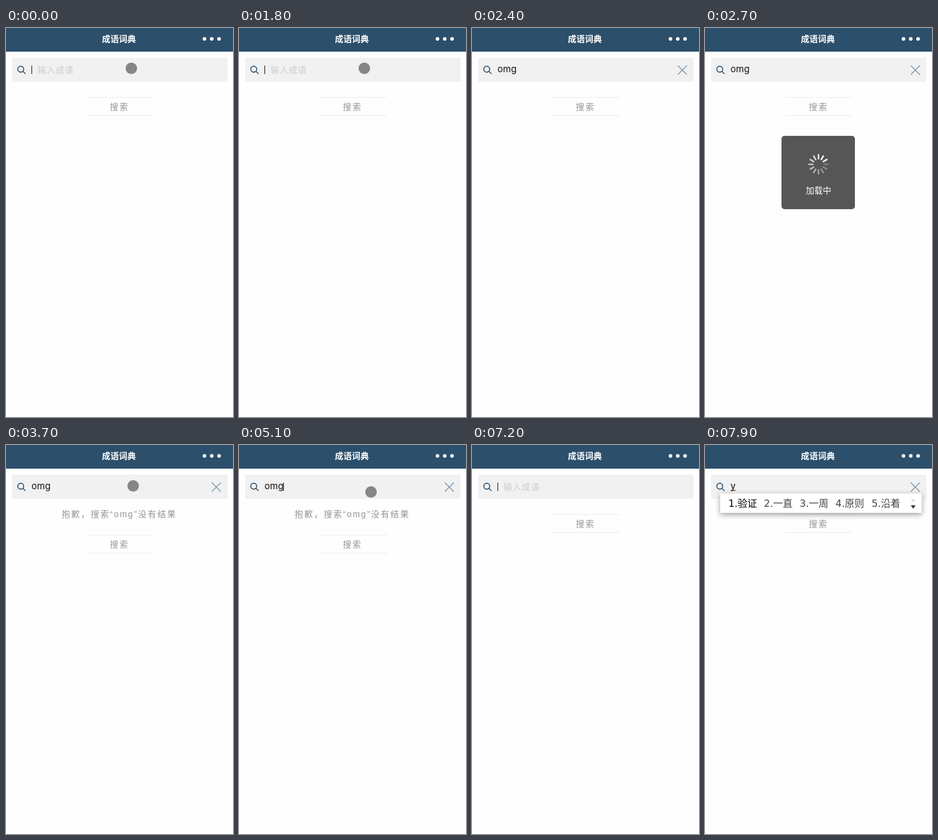
An HTML page that plays this animation: 374x642 px, repeating every 8000 ms.

```html
<!DOCTYPE html>
<html lang="zh-CN">
<head>
<meta charset="utf-8">
<style>
html, body { margin: 0; width: 100%; height: 100%; overflow: hidden; background: #fefefe; }
svg { display: block; width: 100%; height: 100%; }
text { font-family: "Noto Sans CJK SC", "Noto Sans CJK", sans-serif; font-size: 14px; white-space: pre; }
.title { font-weight: 700; fill: #fff; text-anchor: middle; }
.hint { font-weight: 500; fill: #ccc; letter-spacing: 1px; }
.soft { fill: #929497; letter-spacing: 2px; }
.latin { font-family: "Liberation Sans", Arial, sans-serif; }
.typed { font-family: Inter, sans-serif; font-size: 15px; fill: #111; }
.word { font-family: "DejaVu Sans", "Noto Sans CJK SC", "Noto Sans CJK", sans-serif; font-size: 16px; fill: #444; }
.word:first-of-type { fill: #000; }
.panel { filter: drop-shadow(0 3px 5px rgba(0, 0, 0, .38)); }
</style>
</head>
<body>
<svg viewBox="0 0 374 642">
  <rect width="374" height="642" fill="#fefefe"/>
  <rect width="374" height="39" fill="#2c4f6b"/>
  <text class="title" x="186" y="23">成语词典</text>
  <g fill="#fff">
    <circle cx="327" cy="18" r="3"/><circle cx="339" cy="18" r="3"/><circle cx="351" cy="18" r="3"/>
  </g>

  <rect x="10" y="49" width="355" height="40" rx="3" fill="#f1f1f1"/>
  <g fill="none" stroke="#2c4f6b" stroke-width="1.6" stroke-linecap="round">
    <circle cx="24.3" cy="68" r="4.9"/><path d="M28 71.7L31.7 75.3"/>
  </g>
  <text class="hint" id="hint" x="52" y="74">输入成语</text>
  <text class="typed" id="typed" x="42" y="73"></text>
  <rect id="underline" x="42" y="74.5" height="1" fill="#111"/>
  <rect id="caret" y="62" width="1" height="14" fill="#111"/>
  <path id="clear" d="M339 62L354 77M354 62L339 77" stroke="#7290a8" stroke-width="1.3"/>

  <g id="result" class="soft">
    <text x="91.5" y="119">抱歉，搜索</text>
    <text class="latin" x="171" y="119">“omg”</text>
    <text x="217.5" y="119">没有结果</text>
  </g>

  <g id="button">
    <path d="M132 114.5H244M132 144.5H244" stroke="#ececec"/>
    <text class="soft" x="171" y="135" font-weight="500">搜索</text>
  </g>

  <g id="toast">
    <rect x="126" y="178" width="121" height="121" rx="5" fill="#111" fill-opacity=".7"/>
    <g id="spinner"></g>
    <text x="187" y="273" fill="#fff" text-anchor="middle">加载中</text>
  </g>

  <g id="popup">
    <rect class="panel" x="25" y="80" width="332" height="32" fill="#fff"/>
    <g id="words"></g>
    <path d="M339 93.5L343 88.5L347 93.5Z" fill="#dedede"/>
    <path d="M339 99.5H347L343 105Z" fill="#333"/>
  </g>
  <circle id="pointer" r="9.5" fill="#878587"/>
</svg>
<script>
const LOOP = 8000, STEP = 100, BLINK = 500;
const NS = "http://www.w3.org/2000/svg";
const $ = id => document.getElementById(id);
const [hint, typed, underline, caret, clear, result, button, toast, spinner, popup, words, pointer] =
  ["hint", "typed", "underline", "caret", "clear", "result", "button", "toast", "spinner", "popup", "words", "pointer"].map($);

const typing = [[0, ""], [1900, "o"], [2100, "om"], [2200, "omg"], [5400, "om"], [5600, "o"], [5800, ""], [7700, "y"]];
const route = [[0, 206.5, 66.5], [3200, 206.5, 66.5], [3700, 209.5, 67.5], [4900, 217.5, 77.5]];
const candidates = {
  o: ["哦哦", "噢噢", "欧洲", "偶尔", "欧元"],
  y: ["验证", "一直", "一周", "原则", "沿着"]
};

function add(parent, tag, attrs, text = "") {
  const el = document.createElementNS(NS, tag);
  for (const key in attrs) el.setAttribute(key, attrs[key]);
  el.textContent = text;
  parent.append(el);
  return el;
}
const wordEls = [38.5, 97, 156, 215, 274.5].map(x => add(words, "text", { class: "word", x, y: 102 }));
const spokes = Array.from({ length: 12 }, (_, i) => add(spinner, "rect", {
  x: 185.7, y: 208, width: 2.6, height: 9, rx: 1.3, fill: "#fff", transform: `rotate(${i * 30} 187 225)`
}));

const show = (el, on) => el.setAttribute("visibility", on ? "visible" : "hidden");
const within = (t, from, to) => t >= from && t < to;
const blinkOn = (t, start) => Math.floor((t - start) / BLINK) % 2 === 0;

function caretOn(t) {
  if (t < 1900) return blinkOn(t + 1000, 700);
  if (within(t, 4900, 5400)) return true;
  if (within(t, 5400, 5800)) return true;
  return within(t, 5800, 7700) && blinkOn(t, 5800);
}

function pointerAt(t) {
  let i = 0;
  while (i < route.length - 1 && t >= route[i + 1][0]) i++;
  const a = route[i], b = route[i + 1];
  if (!b) return a.slice(1);
  const u = (t - a[0]) / (b[0] - a[0]), k = u * u * (3 - 2 * u);
  return [a[1] + (b[1] - a[1]) * k, a[2] + (b[2] - a[2]) * k];
}

function render(t) {
  const value = typing.filter(([at]) => t >= at).pop()[1];
  const composing = within(t, 1900, 2400) || t >= 7700;
  const failed = within(t, 3000, 5800);
  const loading = within(t, 2500, 3000);

  typed.textContent = value;
  const width = value ? typed.getComputedTextLength() : 0;
  show(hint, !value);
  show(clear, value);
  show(underline, composing);
  underline.setAttribute("width", width);
  show(caret, caretOn(t));
  caret.setAttribute("x", 42 + Math.round(width));

  show(result, failed);
  button.setAttribute("transform", `translate(0 ${failed ? 34 : 0})`);

  show(toast, loading);
  const turn = Math.floor(t / STEP);
  spokes.forEach((el, i) => el.setAttribute("opacity", 0.25 + 0.75 * ((i - turn + 1200) % 12) / 11));

  show(popup, composing);
  if (composing) {
    candidates[value[0]].forEach((word, i) => wordEls[i].textContent = `${i + 1}.${word}`);
  }

  const [x, y] = pointerAt(t);
  show(pointer, t < 1900 || within(t, 3200, 5400));
  pointer.setAttribute("cx", x);
  pointer.setAttribute("cy", y);
}

const start = performance.now();
function tick() {
  const t = (performance.now() - start) % LOOP;
  render(Math.floor(t / STEP) * STEP);
  requestAnimationFrame(tick);
}
tick();
</script>
</body>
</html>
```
